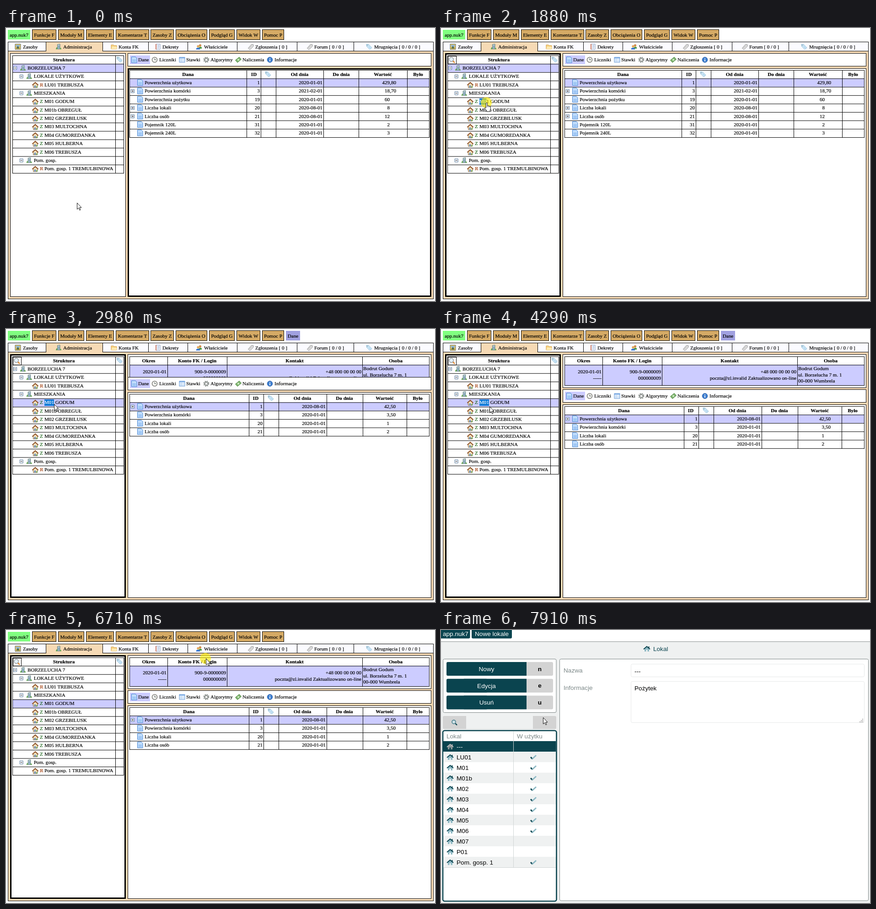
An HTML page that plays this animation: 938 px wide and 597 px high, repeating every 8000 ms.

```html
<!DOCTYPE html>
<html lang="pl">
<head>
<meta charset="utf-8">
<title>Administracja</title>
<style>
html, body { margin: 0; width: 100%; height: 100%; overflow: hidden; background: #fff; }
svg { display: block; }
text { font: 11.1px "Liberation Serif", "Times New Roman", serif; white-space: pre; stroke-width: .2px; transform: translateY(-.4px); }
.sans text { font: 13.6px "Liberation Sans", Arial, sans-serif; stroke-width: 0; transform: none; }
text.b, .sans text.b { font-weight: bold; }
.m { text-anchor: middle; }
.e { text-anchor: end; }
.c { shape-rendering: crispEdges; }
</style>
</head>
<body>
<svg id="stage" width="938" height="597" viewBox="0 0 938 597"></svg>
<script>
const PEACH = '#f6dab5', LILAC = '#ccccff', TAN = '#d5aa65', TEAL = '#0a444f', PALE = '#eff1f1', GREY = '#d3d3d3';
const stage = document.getElementById('stage');

// Drawing helpers
const text = (x, y, s, cls = '', fill = '#000') => `<text x="${x}" y="${y}" class="${cls}" fill="${fill}" stroke="${fill}">${s}</text>`;
const fill = (x, y, w, h, color, more = 'class="c"') => `<rect x="${x}" y="${y}" width="${w}" height="${h}" fill="${color}" ${more}/>`;
const box = (x, y, x2, y2, color = '#fff', more = '') =>
  `<rect class="c" x="${x + .5}" y="${y + .5}" width="${x2 - x}" height="${y2 - y}" fill="${color}" stroke="#000" ${more}/>`;
const hline = (x, x2, y, color = '#000') => fill(x, y.toFixed(2), x2 - x, 1, color, '');
const vline = (x, y, y2, color = '#000') => fill(x, y, 1, y2 - y, color, '');
const round = (x, y, w, h, r, color, more = '') => `<rect x="${x}" y="${y}" width="${w}" height="${h}" rx="${r}" fill="${color}" ${more}/>`;
const group = (id, body, more = '') => `<g id="${id}" ${more}>${body}</g>`;
const path = (d, color, stroke = 'none', more = '') => `<path d="${d}" fill="${color}" stroke="${stroke}" ${more}/>`;
const each = (list, fn) => list.map(fn).join('');

const ICONS = {
  doc: path('M-5.5-6.5H3L6-3.5V6.5H-5.5Z', '#c2defc', '#4080d0') + path('M-3.5 0H4M-3.5 2H4M-3.5 4H4', 'none', '#7fb2ee'),
  clock: '<circle r="5.6" fill="#f3f3ee" stroke="#7d7d78" stroke-width="1.5"/>' + path('M0-3V0H3', 'none', '#455'),
  table: path('M-6-5.5H6V5.5H-6Z', '#eef6ff', '#5c90d0') + path('M-6-4H6', 'none', '#6fa4e4', 'stroke-width="2"') + path('M-6 0H6M-6 3H6M-2-4V5', 'none', '#b0cdee'),
  gear: '<circle r="5.2" fill="none" stroke="#7c837f" stroke-width="2.4" stroke-dasharray="2.2 1.9"/><circle r="3.4" fill="#eee" stroke="#828885" stroke-width="1.6"/>',
  money: path('M-6.5 1L2-6 6.5-1-2 6Z', '#7fb670', '#4d8342') + '<circle r="2" fill="#d5ecca"/>',
  info: '<circle r="5.8" fill="#3e7fd0" stroke="#2a5ea8"/>' + path('M0-3.5V-2M0-.8V3.6', 'none', '#fff', 'stroke-width="1.8"'),
  tower: path('M-2.5 5V-5L3-6V5Z', '#c3d4d8', '#5d7c7e') + path('M-.5-3V4M1.3-3V4', 'none', '#5f8aa8') + path('M-6 5.5Q-5.5 1-3 1V5.5ZM3 5.5V2Q6 2 6 5.5Z', '#62a652'),
  house: path('M-4.5 6V-.5L0-4 4.5-.5V6Z', '#f6e3bd', '#7d5d3c') + path('M-6.6 .8L0-5.2 6.6 .8', 'none', '#94582f', 'stroke-width="2"') + path('M-2 6V1.5H.8V6Z', '#4f7fb5') + path('M2.4 6V3H5V6Z', '#5a9a48'),
  folder: path('M-6-4H-1L0-2.5H6V5H-6Z', '#f7d789', '#d79a3c') + path('M-6 5L-4 0H6V5Z', '#fdebb4'),
  book: path('M-4-6H5V6H-4Z', '#f4f6fb', '#8aa0c0') + path('M-4-6V6', 'none', '#d0664a', 'stroke-width="1.6"') + path('M-1-3H3M-1 0H3M-1 3H2', 'none', '#7c9cd0'),
  people: '<circle cx="2.5" cy="-3" r="2.6" fill="#d08c4a"/>' + path('M-1 4Q-1 0 3 0T6 4Z', '#4f9a45') +
    '<circle cx="-2" cy="-1" r="2.6" fill="#e0a558"/>' + path('M-6.5 6Q-6.5 2-2 2T2.5 6Z', '#3b78d0'),
  clip: path('M-5.5 3L2-5.5 6-4.5 5.5-.5-2 6.5Z', '#e4e4e4', '#8d8d8d') + path('M-3 3L3-3', 'none', '#a5a5a5'),
  tag: path('M-6-5.5L-1-5 6 2 1.5 6-5.5-1Z', '#cfe9f9', '#8fbcd8') + '<circle cx="-3.6" cy="-3.2" r="1.1" fill="#fff" stroke="#8ab"/>' + path('M-1-1L3 3', 'none', '#8bbbdc'),
  photo: path('M-6-6H6V6H-6Z', '#e9c558', '#5d6f7c') + path('M-4-4H4V0H-4Z', '#8bb6dc') + path('M-4 4L0-2 4 4Z', '#4f6b58'),
  lens: path('M1.5 1.5L6 6', 'none', '#dd8a34', 'stroke-width="2.6"') + '<circle cx="-1.4" cy="-1.4" r="4.6" fill="#e6f3fb" stroke="#8c8f94" stroke-width="1.4"/>',
  plus: '<circle cx="3.8" cy="3.8" r="3.1" fill="#4fa83d"/>' + path('M2 3.8H5.6M3.8 2V5.6', 'none', '#fff', 'stroke-width="1.2"')
};
const icon = (names, x, y) => `<g transform="translate(${x} ${y})">${each(names.split('+'), n => ICONS[n])}</g>`;
const toggle = (x, y, open) => `<g transform="translate(${x} ${y})">` + path('M-3.5-3.5H3.5V3.5H-3.5Z', '#fff', '#55779a') +
  path('M-2 0H2' + (open ? '' : 'M0-2V2'), 'none', '#223') + '</g>';

// Top bar
const button = ([s, x, x2]) => box(x, 3, x2 - 1, 25, TAN) + text((x + x2) / 2, 19, s, 'm');
const topBar = fill(4, 4, 49, 21, '#80ff80') + text(28.5, 19, 'app.nuk7', 'm') +
  each([['Funkcje F', 57, 110], ['Moduły M', 114, 171], ['Elementy E', 175, 236]], button) +
  group('comments', button(['Komentarze T', 240, 313])) +
  group('rest', each([['Zasoby Z', 316, 367], ['Obciążenia O', 371, 440], ['Podgląd G', 444, 500], ['Widok W', 504, 556], ['Pomoc P', 560, 608]], button)) +
  group('dataBtn', fill(612, 4, 31, 21, '#a0a0e0') + text(627.5, 19, 'Dane', 'm'));

const tabs = box(4, 30, 934, 592, PEACH) + fill(5, 31, 82, 19, '#fbfbff') + fill(212, 31, 722, 19, '#fbfbff') +
  each([87, 211, 311, 397, 505, 636, 760], x => vline(x, 31, 50)) + hline(5, 88, 50) + hline(211, 934, 50) +
  each([['photo', 26, 'Zasoby', 37], ['tower', 115, 'Administracja', 125], ['folder', 236, 'Konta FK', 246], ['book', 332, 'Dekrety', 342],
    ['people', 422, 'Właściciele', 433], ['clip', 535, 'Zgłoszenia [ 0 ]', 545], ['clip', 664, 'Forum [ 0 / 0 ]', 674], ['tag', 794, 'Mrugnięcia [ 0 / 0 / 0 ]', 805]],
    ([i, ix, s, x]) => icon(i, ix, 41) + text(x, 45, s));

// Structure tree
const ROW = 18.37;
const NODES = [[0, 'BORZELUCHA 7'], [1, 'LOKALE UŻYTKOWE'], ['R', 'LU01 TREBUSZA'], [1, 'MIESZKANIA'], ['Z', 'M01 GODUM'], ['Z', 'M01b OBREGUŁ'],
  ['Z', 'M02 GRZEBILUSK'], ['Z', 'M03 MULTOCHNA'], ['Z', 'M04 GUMOREDANKA'], ['Z', 'M05 HULBERNA'], ['Z', 'M06 TREBUSZA'], [1, 'Pom. gosp.'],
  ['R', 'Pom. gosp. 1 TREMULBINOWA']];
const treeRow = ([kind, s], i) => {
  const y = 87.5 + ROW * i, base = y + 3.8, line = hline(14, 258, 60 + ROW * (i + 2));
  if (typeof kind === 'string')
    return line + icon('house', 64, y) + text(74, base, kind, '', kind === 'Z' ? '#0a5a0a' : '#a03a08') + text(84, base, s);
  const dx = kind * 13.7;
  return line + toggle(20 + dx, y, true) + icon('tower', 37 + dx, y) + text(47 + dx, base, s);
};
const treeFill = (id, i) => `<rect id="${id}" x="14" y="${60 + ROW * (i + 1)}" width="243" height="${ROW}" fill="${LILAC}"/>`;
const tree = box(9, 55, 261, 587) + group('leftFocus', box(10, 56, 260, 586, 'none', 'stroke-width="3"')) +
  treeFill('rootRow', 0) + treeFill('flatRow', 4) +
  vline(14, 60, 318) + vline(239, 60, 318) + vline(257, 60, 318) + hline(14, 258, 60) + hline(14, 258, 60 + ROW) +
  text(126.5, 73, 'Struktura', 'b m') + icon('tag', 248.5, 69) + each(NODES, treeRow) +
  group('search', box(15, 61, 33, 78) + icon('lens', 24, 70)) +
  `<svg id="marked" x="83.6" y="154" height="14" width="0">${fill(0, 0, 30, 14, '#0a78d7')}${text(.4, 10.8, 'M01', '', '#fff')}</svg>`;

// Details panel
const details = box(266, 55, 929, 128) + fill(270, 78, 655, 45, LILAC) + box(270, 60, 925, 123, 'none') + hline(270, 925, 60 + ROW) +
  each([353, 483, 779], x => vline(x, 60, 123)) +
  each([['Okres', 312], ['Konto FK / Login', 418], ['Kontakt', 631], ['Osoba', 852]], ([s, x]) => text(x, 73, s, 'b m')) +
  each([['2020-01-01', 351, 97], ['-----', 351, 111], ['900-9-0000009', 481, 97], ['000000009', 481, 111],
    ['+48 000 00 00 00', 777, 97], ['poczta@zl.invalid Zaktualizowano on-line', 777, 111]], ([s, x, y]) => text(x, y, s, 'e')) +
  each(['Bodrut Godum', 'ul. Borzelucha 7 m. 1', '00-000 Wumbrela'], (s, i) => text(781, 90.5 + i * 13.7, s));

const toolbar = box(266, 55, 929, 83) + fill(271, 60, 44, 19, LILAC) +
  each([['doc', 280, 'Dane', 289], ['clock', 325, 'Liczniki', 335], ['table', 385, 'Stawki', 394], ['gear', 438, 'Algorytmy', 447],
    ['money', 508, 'Naliczenia', 517], ['info', 577, 'Informacje', 587]], ([i, ix, s, x]) => icon(i, ix, 69.5) + text(x, 73.5, s));

// Data grids: column edges, column centres, end of integer part, rows
const grid = (cols, mids, unit, rows) => {
  const top = 92 + ROW, end = top + ROW * rows.length;
  return fill(270, top, 655, ROW, LILAC, '') + each(cols, x => vline(x, 92, end + 1)) + hline(270, 926, 92) + hline(270, 926, top) +
    each(['Dana', 'ID', '', 'Od dnia', 'Do dnia', 'Wartość', 'Było'], (s, i) => text(mids[i], 105, s, 'b m')) + icon('tag', mids[2], 101) +
    each(rows, ([more, name, id, date, val], i) => {
      const y = 119.7 + ROW * i, base = y + 3.8;
      return hline(270, 926, top + ROW * (i + 1)) + (more ? toggle(277, y, false) : '') + icon('doc', 293, y - .5) + text(303, base, name) +
        text(cols[2] - 2, base, id, 'e') + text(cols[4] - 2, base, date, 'e') + text(unit + (val.includes(',') ? 14 : 0), base, val, 'e');
    });
};
const gridA = grid([270, 526, 557, 590, 694, 771, 877, 925], [398, 542, 573, 642, 733, 824, 901], 839, [
  [0, 'Powerzchnia użytkowa', 1, '2020-01-01', '429,80'], [1, 'Powierzchnia komórki', 3, '2021-02-01', '18,70'],
  [0, 'Powierzchnia pożytku', 19, '2020-01-01', '60'], [1, 'Liczba lokali', 20, '2020-08-01', '8'], [1, 'Liczba osób', 21, '2020-08-01', '12'],
  [0, 'Pojemnik 120L', 31, '2020-01-01', '2'], [0, 'Pojemnik 240L', 32, '2020-01-01', '3']]);
const gridB = grid([270, 531, 563, 596, 701, 780, 876, 925], [400, 546, 579, 648, 740, 828, 900], 838, [
  [1, 'Powerzchnia użytkowa', 1, '2020-08-01', '42,50'], [0, 'Powierzchnia komórki', 3, '2020-01-01', '3,50'],
  [0, 'Liczba lokali', 20, '2020-01-01', '1'], [0, 'Liczba osób', 21, '2020-01-01', '2']]);

const content = group('details', details) +
  group('slide', toolbar + '<rect id="gridBox" class="c" x="266.5" y="88.5" width="663" height="499" fill="#fff" stroke="#000"/>' +
    group('rightFocus', box(267, 89, 928, 586, 'none', 'stroke-width="3"')) + group('gridA', gridA) + group('gridB', gridB));

// Drop-down menu
const ITEMS = [['gear', 'struktury', 'S'], ['house', 'mieszkania', 'M'], ['people', 'właścicieli', 'W'], ['doc+plus', 'dane', 'D'], ['table+plus', 'stawki', 'K'],
  ['gear+plus', 'algorytmy', 'A'], ['clock+plus', 'liczniki', 'L'], ['clock+plus', 'odczyty', 'O'], ['clock+plus', 'odczyty wstecz', 'E'],
  ['clock+plus', 'prognozy', 'P'], ['people+plus', 'dane właścicieli', 'C'], ['people', 'dodatkowe adresy korespondencyjne', 'R']];
const menu = box(316, 26, 574, 254) + each([321, 555, 570], x => vline(x, 30.3, 251)) + hline(321, 571, 30.3) +
  each(ITEMS, ([i, s, key], n) => {
    const y = 40 + ROW * n;
    return hline(321, 571, 30.3 + ROW * (n + 1)) + icon(i, 330, y) + text(340, y + 3.8, 'Edytuj ' + s) + text(558, y + 3.5, key);
  });

// Second page
const home = (x, y, roof = TEAL, wall = '#8db9c4') => `<g transform="translate(${x} ${y})">` +
  path('M-5 6V0L0-4 5 0V6H1.5V2H-1.5V6Z', wall) + path('M-7 1L0-5 7 1M4.5-5V-1.5', 'none', roof, 'stroke-width="2"') + '</g>';
const tick = y => path(`M196 ${y}L200 ${y + 4}`, 'none', TEAL, 'stroke-width="3"') + path(`M199.5 ${y + 4}L208 ${y - 4}`, 'none', '#8db9c4', 'stroke-width="3"');
const action = ([s, key], i) => {
  const y = 70 + 36.7 * i;
  return round(12, y, 233, 30, 3, GREY) + round(12, y, 90, 30, 3, TEAL) + fill(50, y, 137, 30, TEAL, '') +
    text(99.5, y + 20, s, 'm', '#fff') + text(216, y + 19.5, key, 'b m');
};
const EDGE = 'stroke="#7d8686"', SOFT = 'stroke="#e6e8e8"', LABEL = '#7b8787';
const FLATS = ['---', 'LU01', 'M01', 'M01b', 'M02', 'M03', 'M04', 'M05', 'M06', 'M07', 'P01', 'Pom. gosp. 1'];
const flat = (s, i) => {
  const y = 243 + 23 * i, on = !i;
  return fill(5, y, 246, 23, on ? TEAL : i % 2 ? PALE : '#fff') + hline(5, 251, y + 23, '#d0d5d5') + vline(158, y, y + 23, '#d0d5d5') +
    home(20, y + 12, on ? '#b9b9b9' : TEAL, on ? '#8c9698' : undefined) + text(34, y + 17, s, '', on ? '#fff' : '#000') +
    (on || i === 9 || i === 10 ? '' : tick(y + 12));
};
const page2 = fill(0, 0, 938, 597, PALE) + fill(0, 0, 938, 25, '#fff') + hline(0, 938, 25, '#8a9292') +
  round(-4, -6, 67.5, 24.5, 3, TEAL) + text(4, 13, 'app.nuk7', '', '#fff') + round(67, -6, 88, 24.5, 3, TEAL) + text(74, 13, 'Nowe lokale', '', '#fff') +
  group('panels', home(450, 41) + text(464, 46, 'Lokal', '', TEAL) +
    round(4.5, 63.5, 247.5, 117, 3, '#fff', EDGE) + each([['Nowy', 'n'], ['Edycja', 'e'], ['Usuń', 'u']], action) +
    round(4, 188, 248, 28.5, 3, GREY) + fill(55, 188, 146, 28, PALE) +
    path('M31 204L35 208', 'none', TEAL, 'stroke-width="2.4"') + '<circle cx="28" cy="201" r="4" fill="#cfe2e8" stroke="#5d8c98" stroke-width="1.8"/>' +
    round(4, 220, 248.5, 373, 4, '#fff', `stroke="${TEAL}" stroke-width="2.6"`) + round(259.5, 63.5, 675, 528.5, 3, '#fff', EDGE)) +
  group('records', text(12, 237, 'Lokal', '', LABEL) + text(166, 237, 'W użytku', '', LABEL) + vline(158, 222, 243, '#d0d5d5') + each(FLATS, flat) +
    text(268, 93, 'Nazwa', '', LABEL) + round(415.5, 74.5, 510, 28, 3, '#fff', SOFT) + text(423, 95, '---') +
    text(268, 131, 'Informacje', '', LABEL) + round(415.5, 112.5, 510, 90, 3, '#fff', SOFT) + text(423, 132, 'Pożytek') +
    path('M921 195h2M918 198h2M921 198h2M915 201h2M918 201h2M921 201h2', 'none', '#999', 'stroke-width="1.5"'));

const pointer = group('spot', '<circle r="12" cx="-1" fill="#ffee00" opacity=".62"/>') +
  group('arrow', path('M.5 .5V14.5L3.7 11.5 6 16.5 8 15.6 5.8 10.7H10Z', '#fff', '#111')) +
  group('hand', path('M-1.5 1Q0-1 1.5 1V7Q3 5.8 4 7.2 5.6 6.4 6.4 8 8.5 7.6 8.5 10V14L7 17V19.5H-.5V17.5L-4.5 12Q-5 9.5-1.5 11Z', '#fff', '#111') +
    path('M1.5 7V10M4 7.5V10M6.4 8V10', 'none', '#111', 'stroke-width=".7"'));

stage.innerHTML = group('page1', topBar + tabs + tree + content + group('menu', menu)) + group('page2', page2, 'class="sans"') + group('pointer', pointer);

// Animation
const el = id => document.getElementById(id);
const show = (id, on) => { el(id).style.display = on ? '' : 'none'; };
const within = (t, a, b) => t >= a && t < b;
// Progress 0..1 that advances in n equal jumps, the first at a and the last at b
const jumps = (t, a, b, n) => t < a ? 0 : Math.min(n, Math.floor((t - a) / ((b - a) / (n - 1) || 1e9) + 1.01)) / n;
const smooth = p => p * p * (3 - 2 * p);
const out = p => 1 - (1 - p) ** 2;
// start, end, jumps, from x y, to x y, easing
const MOVES = [
  [0, 0, 1, 155, 382, 155, 382, smooth],
  [440, 1110, 7, 155, 382, 86, 161, smooth],
  [1320, 1320, 1, 82, 160, 82, 160, smooth],
  [1540, 2210, 7, 82, 160, 104, 164, out],
  [2320, 2320, 1, 105, 164, 105, 164, smooth],
  [4290, 4290, 1, 106, 169, 106, 169, smooth],
  [4400, 5050, 7, 106, 169, 348, 16, smooth],
  [5830, 6370, 6, 348, 16, 437, 62, smooth],
  [7580, 7910, 4, 437, 62, 223, 191, smooth]
];

function draw(t) {
  const [a, b, n, x0, y0, x1, y1, ease] = MOVES.filter(m => t >= m[0]).pop();
  const p = ease(jumps(t, a, b, n)), x = x0 + (x1 - x0) * p, y = y0 + (y1 - y0) * p;
  el('pointer').setAttribute('transform', `translate(${x.toFixed(1)} ${y.toFixed(1)})`);
  const hand = within(t, 1320, 2320) || within(t, 5050, 5830);
  show('hand', hand);
  show('arrow', !hand);
  show('spot', within(t, 1540, 2320) || within(t, 5160, 5270) || within(t, 6710, 6810));

  show('page1', t < 6810);
  show('page2', t >= 6930);
  show('panels', t >= 7040);
  show('records', t >= 7150);

  const loading = within(t, 2660, 2770), picked = t >= 2770;
  show('rightFocus', t < 120);
  show('leftFocus', t >= 220);
  show('search', t >= 440);
  show('comments', !loading);
  el('rest').setAttribute('transform', `translate(${loading ? -76 : 0} 0)`);
  show('dataBtn', within(t, 2770, 4720));
  show('rootRow', !picked);
  el('flatRow').setAttribute('fill', picked ? LILAC : loading ? '#d0d0d0' : 'none');
  const drag = x - 84;
  el('marked').setAttribute('width', t < 1540 || t >= 5270 ? 0 : t >= 2100 ? 21.4 : drag > 13 ? 15.9 : drag > 5 ? 10.3 : 0);

  show('details', t >= 2660);
  const drop = Math.round(77 * smooth(jumps(t, 2770, 3190, 5)));
  el('slide').setAttribute('transform', `translate(0 ${drop})`);
  el('gridBox').setAttribute('height', 499 - drop);
  show('gridA', !picked);
  show('gridB', picked);
  show('menu', within(t, 5380, 6710));
}

const begin = performance.now();
function tickFrame() {
  draw((performance.now() - begin) % 8000);
  requestAnimationFrame(tickFrame);
}
tickFrame();
</script>
</body>
</html>
```
